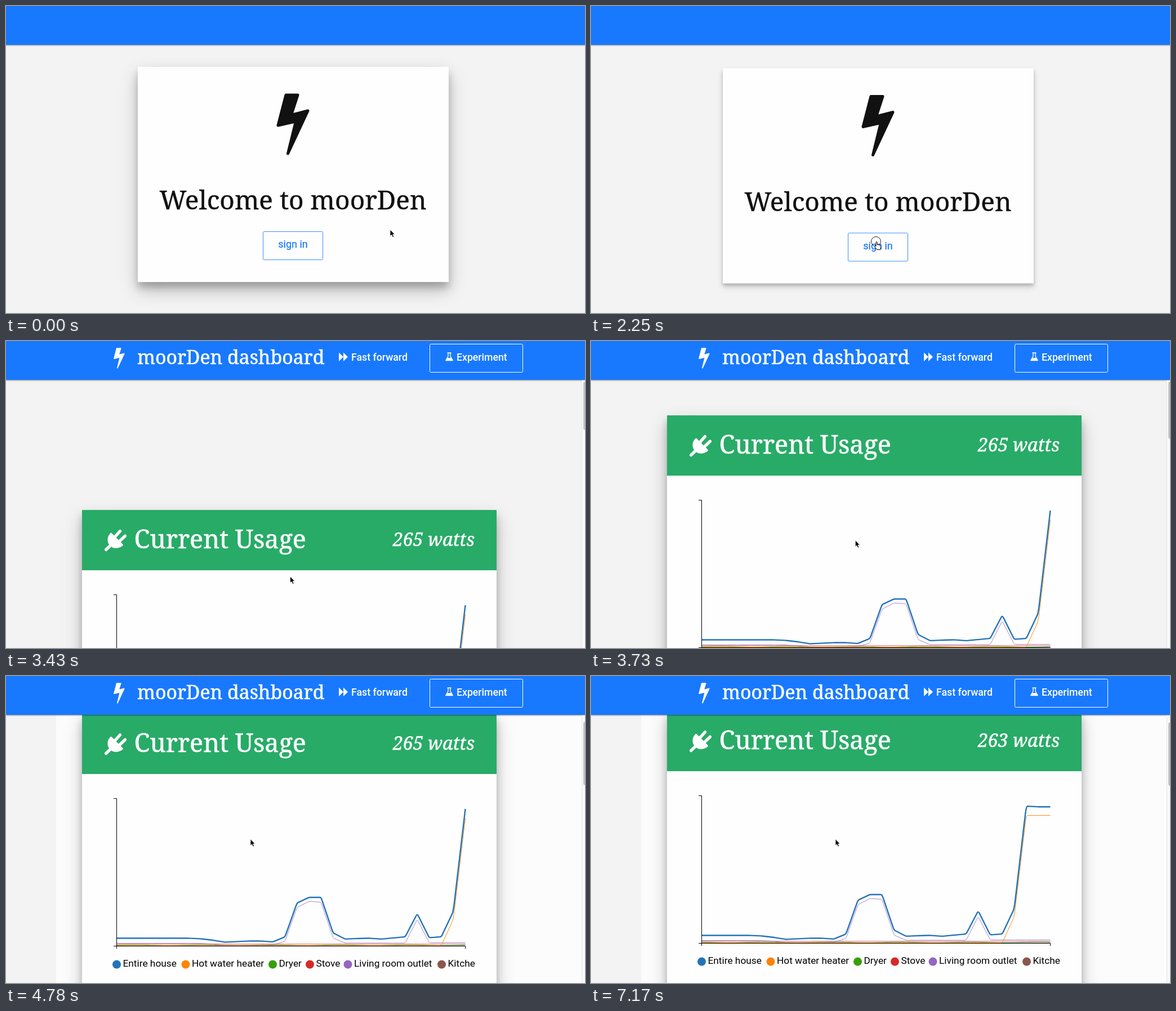
Recreate the animation shown at these times as an HTML page. Size 1028 by 545 pixels, loop 8 s.

```html
<!DOCTYPE html>
<html lang="en">
<head>
<meta charset="utf-8">
<title>moorDen dashboard</title>
<style>
  html, body { margin: 0; width: 100%; height: 100%; overflow: hidden; background: #f3f3f3; }
  #stage { position: absolute; inset: 0; width: 1028px; height: 545px; overflow: hidden; background: #f3f3f3; }
  #stage > * { position: absolute; }
  svg { position: absolute; left: 0; top: 0; overflow: visible; }
  .serif { font-family: "Noto Serif", serif; }
  .sans { font-family: Roboto, sans-serif; }
  .mid { font-weight: 500; font-size: 17.7px; }
  .white { fill: #fff; stroke: #fff; stroke-width: .6px; }
  .card { top: 0; background: #fefefe; box-shadow: 0 14px 30px rgba(0,0,0,.23), 0 10px 12px rgba(0,0,0,.2); }
  #tint { left: 89px; top: 69px; width: 939px; height: 476px; background: #fcfcfc; }
  #login { left: 234px; width: 552px; height: 382px; }
  #usage { left: 135px; width: 736px; height: 720px; }
  #usage .top { height: 107px; background: #28ab67; }
  #bar { left: 0; top: 0; width: 1028px; height: 69px; background: #1879ff; box-shadow: 0 1px 2px rgba(0,0,0,.45); }
  #track { left: 1022px; top: 70px; width: 6px; height: 475px; background: #fafafa; border-left: 1px solid #e6e6e6; box-sizing: border-box; overflow: hidden; }
  #thumb { position: absolute; left: 2px; width: 8px; border-radius: 4px; background: #c1c1c1; }
</style>
</head>
<body>
<div id="stage">
  <div id="tint"></div>

  <div id="login" class="card">
    <svg width="552" height="382">
      <path id="bolt" transform="translate(246 47)" d="M17 3H38L26.5 38.5L56 31L20.5 107L34.5 50L3 57Z" fill="#111" stroke="#111" stroke-width="5" stroke-linejoin="round"/>
      <text class="serif" x="275.5" y="253" font-size="46" text-anchor="middle" fill="#111" stroke="#111" stroke-width=".4">Welcome to moorDen</text>
      <rect x="222.5" y="292.5" width="106" height="50" rx="2" fill="none" stroke="#3d8dff"/>
      <text class="sans" x="275.5" y="321" font-size="18" text-anchor="middle" fill="#1879ff" stroke="#1879ff" stroke-width=".25">sign in</text>
    </svg>
  </div>

  <div id="usage" class="card">
    <div class="top"></div>
    <svg width="736" height="720">
      <g transform="translate(-135 0)">
        <g transform="translate(175 33)" fill="#fff" stroke="#fff" stroke-linecap="round" stroke-linejoin="round">
          <path d="M11.5 9L31.5 29C26 34 16 35 11 29.5C5 24 6 14 11.5 9Z" stroke-width="3"/>
          <path d="M19 14L27.5 4.5M27 22L36.5 13M11 29.5L2.5 37.5" stroke-width="5.2"/>
        </g>
        <text class="serif white" x="227.5" y="68" font-size="45">Current Usage</text>
        <text id="watts" class="serif white" x="832" y="64" font-size="32" font-style="italic" text-anchor="end"></text>
        <g id="lines" fill="none" stroke-linejoin="round"></g>
        <path d="M191 150.5H196.5V412.5H191M196.5 417V412.5H815.5V417" fill="none" stroke="#000"/>
        <g id="legend" class="sans" font-size="17.3"></g>
      </g>
    </svg>
  </div>

  <div id="bar">
    <svg id="nav" width="1028" height="69" fill="#fff">
      <path transform="translate(191 12) scale(.335)" d="M17 3H38L26.5 38.5L56 31L20.5 107L34.5 50L3 57Z" stroke="#fff" stroke-width="5" stroke-linejoin="round"/>
      <text class="serif white" x="233" y="41" font-size="33.8">moorDen dashboard</text>
      <path d="M591 20.5L599 28.3L591 36ZM599 20.5L607 28.3L599 36Z"/>
      <text class="sans mid" x="613" y="34.5">Fast forward</text>
      <rect x="752.5" y="5.5" width="165" height="50" rx="2" fill="none" stroke="#fff"/>
      <path d="M783.5 21H790.5M785 21V27L780.8 34.5H793.2L789 27V21" fill="none" stroke="#fff" stroke-width="1.4" stroke-linejoin="round"/>
      <path d="M783.5 30H790.5L793 34.5H781Z"/>
      <text class="sans mid" x="800" y="34.5">Experiment</text>
    </svg>
  </div>

  <div id="track"><div id="thumb"></div></div>

  <svg width="1028" height="545">
    <circle id="ring" cx="506" cy="418" fill="none" stroke="#222"/>
    <g id="cursor">
      <path id="arrow" d="M0 0V11.5L2.6 9.2L4.6 13.5L6.6 12.6L4.7 8.4H8.2Z" fill="#000" stroke="#fff" stroke-width=".8"/>
      <path id="hand" d="M1.5 1C2.5 0 3.6 .8 3.7 2V6C4.5 5 5.7 5.3 6 6.3C7 5.6 8 6 8.2 7C9.3 6.5 10 7.2 10 8.3V11L8.7 14.5H3.2L-.8 9.5C-1.5 8.3 0 7.3 1.3 8.8Z" fill="#fff" stroke="#000"/>
    </g>
  </svg>
</div>

<script>
const LOOP = 8000;
const TICKS = [0, 450, 600, 750, 900, 1350, 1500,
  2250, 2400, 2550, 2700, 2850, 3000, 3140, 3290,
  3430, 3580, 3730, 3880, 4030,
  4330, 4480, 4630, 4780, 4930, 5230, 7170];

const $ = id => document.getElementById(id);
const clamp = x => Math.max(0, Math.min(1, x));
const part = (t, a, b) => clamp((t - a) / (b - a));
const smooth = p => p * p * (3 - 2 * p);
const mix = (a, b, p) => a + (b - a) * p;
const flat = (v, n) => Array(n).fill(v);
const show = (id, on) => { $(id).style.display = on ? "" : "none"; };
const slide = (id, y) => { $(id).style.transform = `translateY(${y}px)`; };

// Heights above the axis, one per sample; two spare samples for the scrolling window
const COUNT = 30;
const range = fn => Array.from({ length: COUNT + 2 }, (_, i) => fn(i));
const SERIES = [
  ["#8c564b", .7, range(() => .8)],
  ["#2ca02c", .8, range(i => 1.3 + .8 * Math.sin(i * 1.1))],
  ["#d62728", .7, range(() => 3.2)],
  ["#9467bd", .8, [...flat(4.5, 8), 3, ...flat(1, 4), 1.5, 8, 68, 79, 77.5, 14, ...flat(5, 6), 47, ...flat(5.5, 6)]],
  ["#ff8c10", 1, [...flat(.5, 28), 47, ...flat(226.5, 3)]],
  ["#2273b9", 2.4, [...flat(13.5, 7), 12.5, 10, 6.5, 7.5, 8.5, 8.5, 7, 16, 76, 86, 86, 23,
    12, 13, 13.5, 12, 14, 16, 57, 14.5, 16, 61, 243, 241.8, 241.8]]
];
const LEGEND = [
  [196.5, "#2273b9", "Entire house"], [319, "#ff8300", "Hot water heater"],
  [473.5, "#36a008", "Dryer"], [539.5, "#d42a26", "Stove"],
  [607, "#9465c4", "Living room outlet"], [773.5, "#8c564b", "Kitche"]
];

function add(parent, tag, attrs, text = "") {
  const el = document.createElementNS("http://www.w3.org/2000/svg", tag);
  for (const k in attrs) el.setAttribute(k, attrs[k]);
  el.textContent = text;
  return parent.appendChild(el);
}

// Polyline with slightly rounded corners
function linePath(values) {
  const pts = values.map((v, i) => [196.5 + i * 619 / (COUNT - 1), 412 - v]);
  const near = (a, b) => [mix(a[0], b[0], .09), mix(a[1], b[1], .09)];
  let d = "M" + pts[0];
  for (let i = 1; i < pts.length - 1; i++)
    d += `L${near(pts[i], pts[i - 1])}Q${pts[i]} ${near(pts[i], pts[i + 1])}`;
  return d + "L" + pts[pts.length - 1];
}

const lines = SERIES.map(([stroke, width]) =>
  add($("lines"), "path", { stroke, "stroke-width": width }));
for (const [x, fill, label] of LEGEND) {
  add($("legend"), "circle", { cx: x, cy: 445, r: 7.5, fill });
  add($("legend"), "text", { x: x + 11, y: 449 }, label);
}

let shift = -1;
function setChart(n) {
  if (n === shift) return;
  shift = n;
  $("watts").textContent = `${265 - n} watts`;
  SERIES.forEach(([, , v], i) => lines[i].setAttribute("d", linePath(v.slice(n, n + COUNT))));
}

function drawPointer(t) {
  const p = smooth(part(t, 320, 900));
  const q = smooth(part(t, 3430, 4030));
  const x = mix(mix(682, 504.5, p), 434, q);
  const y = mix(397 + 21 * p + 18 * Math.sin(Math.PI * p), 289.5, q);
  const over = x < 562 && t < 2850;
  show("hand", over);
  show("arrow", !over);
  $("cursor").setAttribute("transform", `translate(${x} ${y})`);
  show("ring", t >= 1350 && t < 2400);
  $("ring").setAttribute("r", t < 1500 ? 6 : 8.5);
}

function drawLogin(t) {
  const n = Math.max(0, (t - 2100) / 150);
  show("login", n < 5);
  slide("login", 108 + 2.5 * n ** 3.6);
  $("login").style.boxShadow = n
    ? "0 6px 10px rgba(0,0,0,.17), 0 3px 5px rgba(0,0,0,.17)" : "";
}

function drawDashboard(t) {
  const left = 1 - part(t, 3000, 4030);
  const s = part(t, 4180, 4930);
  const scroll = Math.round(46 * (1 - (1 - s) ** 1.36));
  show("usage", t >= 3140);
  slide("usage", Math.round(108 + 970 * left ** 3) - scroll);
  show("tint", t >= 4330);
  $("nav").style.opacity = part(t, 2800, 3190);
  show("track", t >= 2850);
  $("thumb").style.top = 2 + scroll * .22 + "px";
  $("thumb").style.height = 113 - 53 * left ** 1.25 + "px";
  setChart(t < 5230 ? 0 : t < 7170 ? 1 : 2);
}

const start = performance.now();
function frame() {
  const now = (performance.now() - start) % LOOP;
  const t = TICKS.findLast(k => k <= now) ?? 0;
  drawPointer(t);
  drawLogin(t);
  drawDashboard(t);
  requestAnimationFrame(frame);
}
frame();
</script>
</body>
</html>
```
